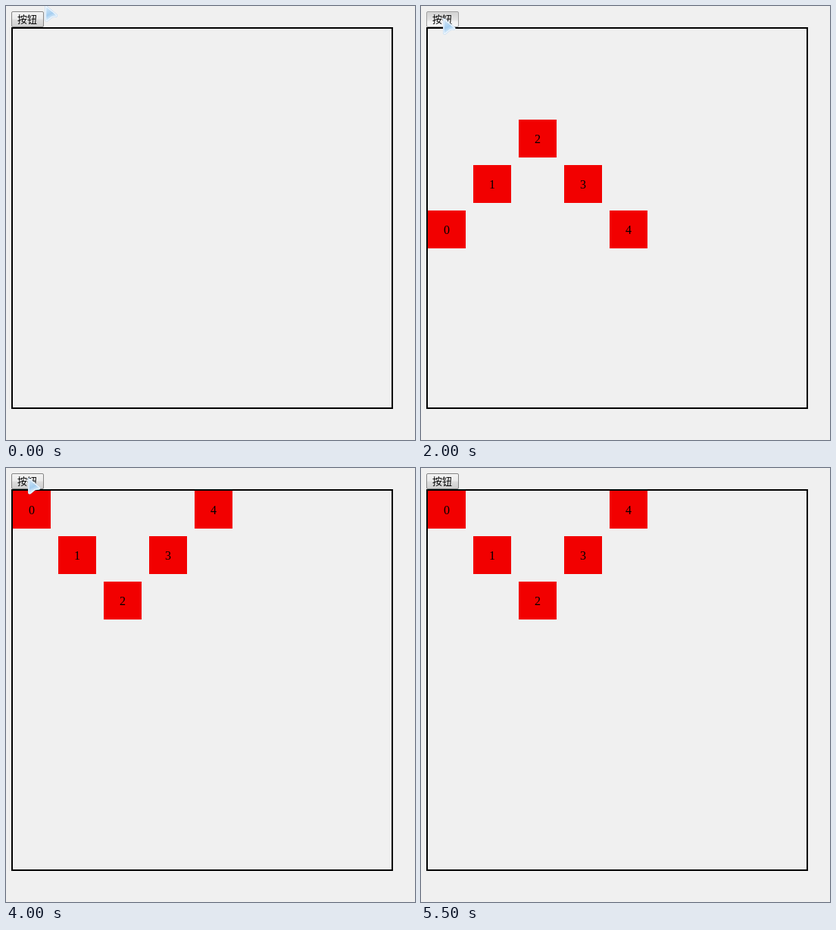
An HTML page with a canvas for the animation above (6500 ms loop, 540 px wide and 573 px high).

```html
<!DOCTYPE html>
<html lang="zh">
<head>
<meta charset="utf-8">
<style>
html, body { margin: 0; width: 100%; height: 100%; overflow: hidden; background: #f0f0f0; }
canvas { display: block; }
</style>
</head>
<body>
<canvas id="stage" width="540" height="573"></canvas>
<script>
const ctx = document.getElementById('stage').getContext('2d');
const STEP = 500, LOOP = 6500;

// Cell coordinates of square i in each arrangement
const layouts = {
  down: i => [i, 2 - Math.abs(i - 2)],
  up: i => [i, 2 + Math.abs(i - 2)],
  right: i => [2 - Math.abs(i - 2), i],
  left: i => [2 + Math.abs(i - 2), i]
};
const shapes = [null, null, 'down', 'down', 'up', 'up', 'right', 'left',
  'down', 'left', 'down', 'down', 'down'];
const pointerY = [-1, 18, 17, 15, 16, 16, 13, 13, 13, 13, 13];
const PRESSED = 4;

function rect(color, x, y, w, h) {
  ctx.fillStyle = color;
  ctx.fillRect(x, y, w, h);
}

function gradient(x0, y0, x1, y1, stops) {
  const g = ctx.createLinearGradient(x0, y0, x1, y1);
  stops.forEach(([at, color]) => g.addColorStop(at, color));
  return g;
}

function label(text, x, y, font) {
  ctx.font = font;
  ctx.fillStyle = '#000';
  ctx.textAlign = 'center';
  ctx.fillText(text, x, y);
}

function drawButton(pressed) {
  const stops = pressed
    ? [[0, '#d2d2d2'], [0.5, '#e2e2e2'], [0.68, '#f3f3f3'], [1, '#f5f5f5']]
    : [[0, '#f3f3f3'], [0.48, '#ebebeb'], [0.52, '#dedede'], [1, '#cfcfcf']];
  ctx.fillStyle = gradient(0, 8, 0, 27, stops);
  ctx.beginPath();
  ctx.roundRect(7.5, 7.5, 42, 20, 1.5);
  ctx.fill();
  ctx.strokeStyle = pressed ? '#a0a0a0' : '#858585';
  ctx.lineWidth = 1;
  ctx.stroke();
  label('按钮', 28, 22, '13px "Noto Sans CJK SC", "Noto Sans CJK", sans-serif');
}

function drawSquares(layout) {
  for (let i = 0; i < 5; i++) {
    const [col, row] = layout(i);
    const x = 9 + col * 60, y = 30 + row * 60;
    rect('#f20000', x, y, 50, 50);
    label(i, x + 25, y + 31, '16px "Liberation Serif", serif');
  }
}

function drawPointer(x, y) {
  ctx.save();
  ctx.translate(x, y);
  ctx.beginPath();
  ctx.moveTo(2, 1);
  ctx.lineTo(16.5, 13);
  ctx.quadraticCurveTo(17, 15, 14, 14.8);
  ctx.lineTo(10, 15.5);
  ctx.lineTo(4, 20.5);
  ctx.quadraticCurveTo(1.5, 21, 2, 18.5);
  ctx.closePath();
  ctx.lineJoin = 'round';
  ctx.strokeStyle = '#a9cdf0';
  ctx.lineWidth = 2;
  ctx.stroke();
  ctx.fillStyle = gradient(3, 3, 10, 18, [[0, '#d3e7f7'], [0.6, '#a5cef0'], [1, '#e2f1fc']]);
  ctx.fill();
  ctx.strokeStyle = '#f1f7fd';
  ctx.lineWidth = 1.2;
  ctx.stroke();
  ctx.restore();
}

function draw(t) {
  const step = Math.floor(t % LOOP / STEP);
  rect('#f0f0f0', 0, 0, 540, 573);
  drawButton(step === PRESSED);
  ctx.strokeStyle = '#000';
  ctx.lineWidth = 2;
  ctx.strokeRect(8, 29, 502, 502);
  if (shapes[step]) drawSquares(layouts[shapes[step]]);
  if (step < pointerY.length) drawPointer(step ? 28 : 50.5, pointerY[step]);
}

const start = performance.now();
function tick() {
  draw(performance.now() - start);
  requestAnimationFrame(tick);
}
tick();
</script>
</body>
</html>
```
